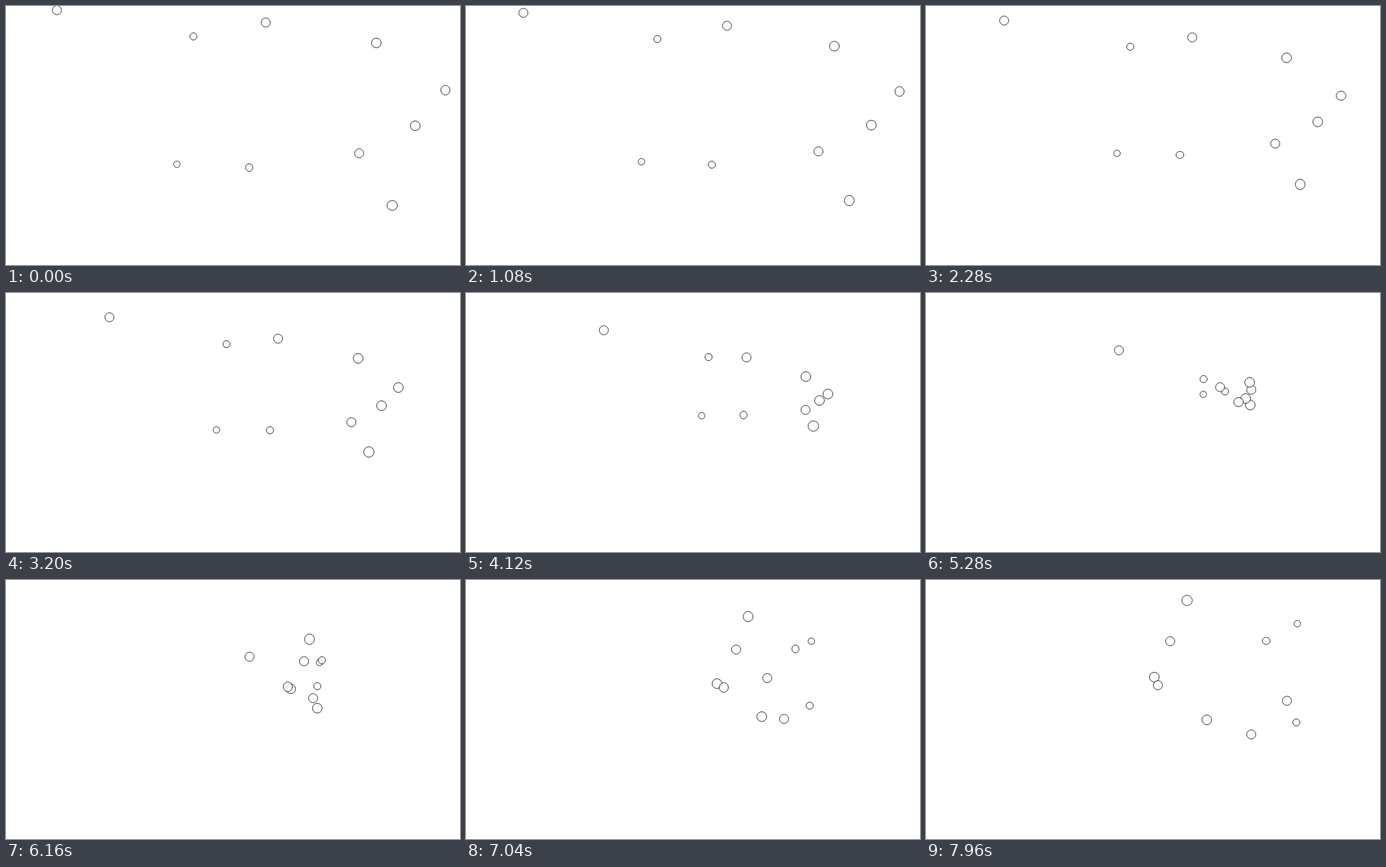
Write an HTML page with a canvas that moves like this. It is 700x400 px and loops after 8 s.

```html
<!DOCTYPE html>
<html lang="en">
<head>
<meta charset="utf-8">
<title>Mutual attraction</title>
<style>
  html, body { margin: 0; width: 100%; height: 100%; overflow: hidden; background: #fff; }
  canvas { display: block; }
</style>
</head>
<body>
<canvas id="stage" width="700" height="400"></canvas>
<script>
const STEP = 40, STEPS = 200;
const GRAVITY = 0.26, NEAR = 5, FAR = 25;
const ctx = document.getElementById('stage').getContext('2d');

const ball = (x, y, r) => ({ x, y, r, vx: 0, vy: 0 });

// Starting places and radii, from back to front; the radius is also the mass.
const balls = [
  ball(263.5, 244.5, 5.5),
  ball(375, 249.5, 6.25),
  ball(571, 57, 8),
  ball(631, 185, 8),
  ball(677.5, 130, 7.75),
  ball(544.5, 227.5, 7.5),
  ball(595.5, 308, 8.25),
  ball(400.5, 25, 7.5),
  ball(289, 47, 6),
  ball(78.4, 6.8, 7.5)
];

// Inverse-square attraction, with the distance kept between NEAR and FAR.
function attract(a, b) {
  const dx = b.x - a.x, dy = b.y - a.y;
  const distance = Math.hypot(dx, dy);
  if (!distance) return;
  const reach = Math.min(FAR, Math.max(NEAR, distance));
  const pull = GRAVITY * b.r / (reach * reach * distance);
  a.vx += dx * pull;
  a.vy += dy * pull;
}

function accelerate() {
  for (const a of balls) for (const b of balls) attract(a, b);
}

function move() {
  for (const b of balls) {
    b.x += b.vx;
    b.y += b.vy;
  }
}

accelerate();
const poses = Array.from({ length: STEPS }, () => {
  const pose = balls.map(({ x, y, r }) => ({ x, y, r }));
  accelerate();
  move();
  return pose;
});

// Outlines sit on whole pixels.
const snap = v => Math.round(v - 0.5) + 0.5;

function drawBall({ x, y, r }) {
  const path = r - 0.5;
  const left = snap(x - path), right = snap(x + path);
  const top = snap(y - path), bottom = snap(y + path);
  ctx.beginPath();
  ctx.ellipse((left + right) / 2, (top + bottom) / 2,
    (right - left) / 2, (bottom - top) / 2, 0, 0, 2 * Math.PI);
  ctx.fill();
  ctx.stroke();
}

function draw() {
  const step = Math.floor(performance.now() / STEP) % STEPS;
  ctx.clearRect(0, 0, 700, 400);
  ctx.fillStyle = 'rgba(255, 255, 255, 0.7)';
  ctx.strokeStyle = '#2a2a2a';
  ctx.lineWidth = 1;
  poses[step].forEach(drawBall);
  requestAnimationFrame(draw);
}
draw();
</script>
</body>
</html>
```
